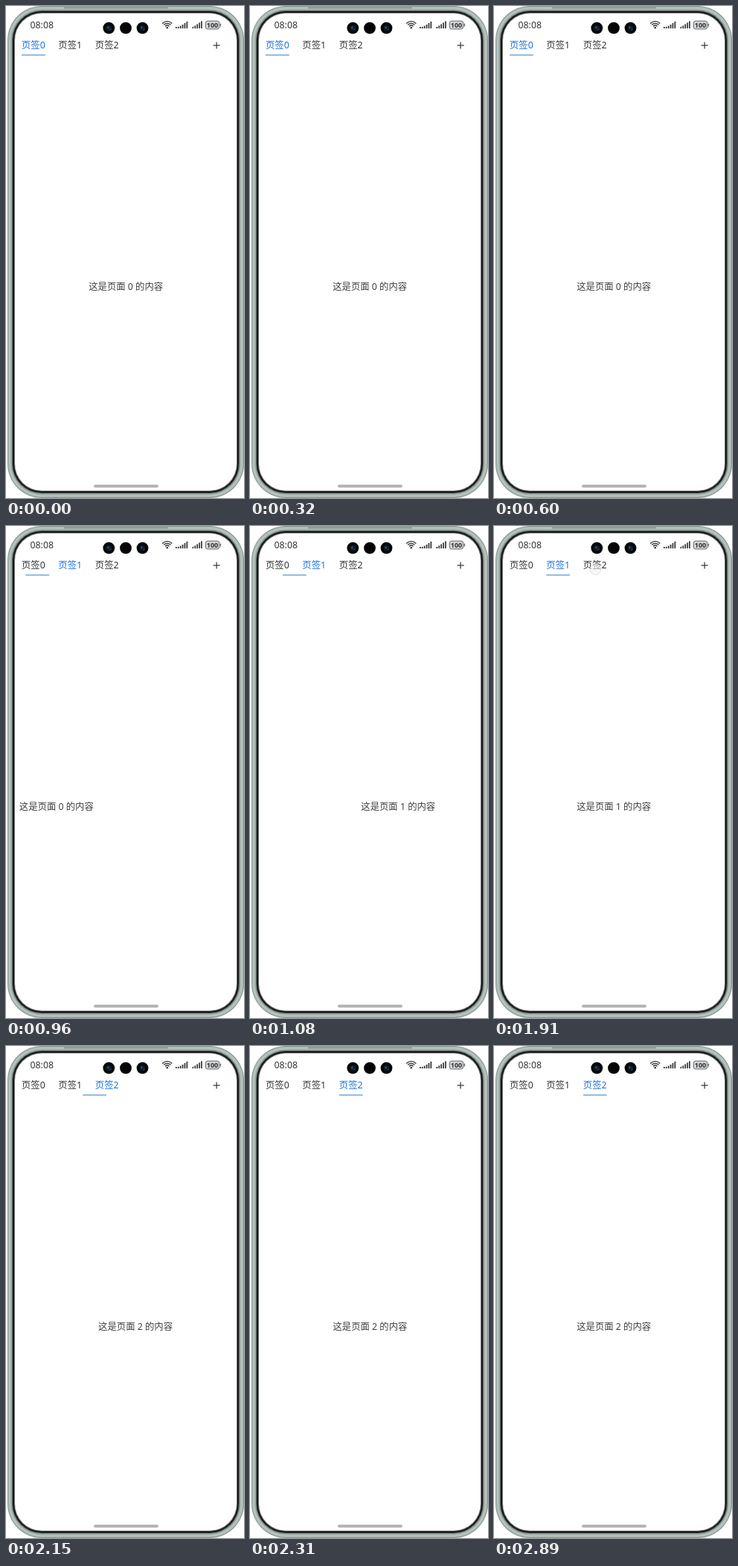
Recreate the animation shown at these times as an HTML page with a canvas. Size 320 by 662 pixels, loop 3.26 s.

```html
<!DOCTYPE html>
<html lang="zh">
<head>
<meta charset="utf-8">
<title>页签</title>
<style>
html, body { margin: 0; width: 100%; height: 100%; overflow: hidden; background: #fff; }
canvas { display: block; width: 320px; height: 662px; }
</style>
</head>
<body>
<canvas id="stage"></canvas>
<script>
const W = 320, H = 662, LOOP = 3260;
const FONT = '"Noto Sans", "Noto Sans CJK SC", "Noto Sans CJK", sans-serif';
const INK = '#303235', BLUE = '#1c6fe3';
const TABS = [21, 70.3, 119.8];
const PAGE_W = 298;
const SWITCHES = [900, 1910];

// Concentric rings of the phone: inset and colour
const RINGS = [
  [0, '#84958d'], [1, '#aebcb6'], [2.5, '#b7c3bd'], [4.5, '#98a49f'],
  [6, '#5c6562'], [7, '#151817'], [9, '#747877'], [10, '#fff']
];

const canvas = document.getElementById('stage');
const c = canvas.getContext('2d');
const dpr = window.devicePixelRatio || 1;
canvas.width = W * dpr;
canvas.height = H * dpr;
c.scale(dpr, dpr);

function rounded(x, y, w, h, r) {
  c.beginPath();
  c.roundRect(x, y, w, h, r);
}

function fillRounded(x, y, w, h, r, fill) {
  rounded(x, y, w, h, r);
  c.fillStyle = fill;
  c.fill();
}

function ring(inset) {
  rounded(2 + inset, inset, 318 - 2 * inset, 662 - 2 * inset, 46 - inset);
}

function disc(x, y, r, fill) {
  c.beginPath();
  c.arc(x, y, r, 0, Math.PI * 2);
  c.fillStyle = fill;
  c.fill();
}

function text(str, x, y, { size = 12.35, weight = 400, color = INK, align = 'left' } = {}) {
  c.font = `${weight} ${size}px ${FONT}`;
  c.textAlign = align;
  c.fillStyle = color;
  c.fillText(str, x, y);
}

function line(color, width, ...pts) {
  c.beginPath();
  pts.forEach(([x, y], i) => i ? c.lineTo(x, y) : c.moveTo(x, y));
  c.strokeStyle = color;
  c.lineWidth = width;
  c.stroke();
}

// Damped spring for the page, 0 to 1
function spring(ms) {
  if (ms <= 0) return 0;
  if (ms > 400) return 1;
  const s = ms / 1000 * 1.02, decay = 17, freq = 6.24;
  return 1 - Math.exp(-decay * s) * (Math.cos(freq * s) + decay / freq * Math.sin(freq * s));
}

// Soft ease for the tab indicator
function glide(ms) {
  const x = Math.min(1, Math.max(0, ms / 380));
  return (x + (1 - Math.cos(Math.PI * x)) / 2) / 2;
}

function drawBody() {
  for (const [inset, color] of RINGS) {
    ring(inset);
    c.fillStyle = color;
    c.fill();
  }
  line('#7b8983', 1.5, [78, 2.5], [218, 2.5]);
}

function drawCamera() {
  for (const x of [138.3, 161, 183.5]) disc(x, 29.6, 7.9, '#050507');
  for (const x of [138.3, 183.5]) {
    disc(x, 29.6, 4.2, '#111827');
    disc(x - 1, 29, 1.5, '#35496b');
    disc(x + 2, 31.5, .7, '#53617a');
  }
}

function drawBars(x, heights) {
  c.fillStyle = INK;
  heights.forEach((h, i) => c.fillRect(x + i * 2.9, 30.2 - h, 1.7, h));
}

function drawStatus() {
  text('08:08', 32.5, 29.9);

  c.lineCap = 'round';
  c.strokeStyle = INK;
  c.lineWidth = 1.3;
  for (const r of [3.3, 6, 8.6]) {
    c.beginPath();
    c.arc(216.8, 29.3, r, -Math.PI * .75, -Math.PI * .25);
    c.stroke();
  }
  c.lineCap = 'butt';
  disc(216.8, 29.2, 1.3, INK);

  drawBars(228, [2.2, 2.2, 3.5, 5.2, 7.2, 9.4]);
  drawBars(250.5, [2.2, 3.8, 5.8, 7.8, 9.8]);

  fillRounded(268.2, 20.2, 18.6, 10.8, 3, '#d3d4d6');
  c.strokeStyle = '#66686b';
  c.lineWidth = 1;
  c.stroke();
  fillRounded(287.7, 23.6, 1.4, 4, .7, '#66686b');
  text('100', 277.5, 29, { size: 9, weight: 700, align: 'center' });
}

function drawTabs(active, pos) {
  TABS.forEach((x, i) => text('页签' + i, x, 56.7, { color: i === active ? BLUE : INK }));
  const from = Math.floor(pos), next = Math.min(from + 1, 2);
  const x = TABS[from] + (TABS[next] - TABS[from]) * (pos - from);
  c.fillStyle = '#4f92d2';
  c.fillRect(x, 65.4, 31.8, 1.2);

  line(INK, 1.2, [278.5, 53], [287.7, 53]);
  line(INK, 1.2, [283.1, 48.4], [283.1, 57.6]);
}

function drawPages(pos) {
  c.save();
  ring(10);
  c.clip();
  for (let i = 0; i < 3; i++) {
    text(`这是页面 ${i} 的内容`, 161.2 + (i - pos) * PAGE_W, 382.2, { align: 'center', color: '#3c3e41' });
  }
  c.restore();
}

function drawTouch() {
  disc(136.5, 58, 7.6, 'rgba(240,240,243,.55)');
  c.strokeStyle = 'rgba(150,152,158,.3)';
  c.lineWidth = .8;
  c.stroke();
}

function tick(t) {
  const start = t < 1910 ? 0 : 1910;
  const at = start + Math.floor((t - start) / 40) * 40;
  return t < 1910 ? Math.min(at, 1280) : at;
}

function draw(t) {
  const sum = ease => SWITCHES.reduce((p, s) => p + ease(t - s), 0);
  const active = SWITCHES.filter(s => t > s).length;
  c.fillStyle = '#fff';
  c.fillRect(0, 0, W, H);
  drawBody();
  drawStatus();
  drawCamera();
  drawTabs(active, sum(glide));
  drawPages(sum(spring));
  if (t === 1910) drawTouch();
  fillRounded(118, 644, 87, 4, 2, '#b5b5b9');
}

const began = performance.now();
function frame() {
  draw(tick((performance.now() - began) % LOOP));
  requestAnimationFrame(frame);
}
frame();
</script>
</body>
</html>
```
